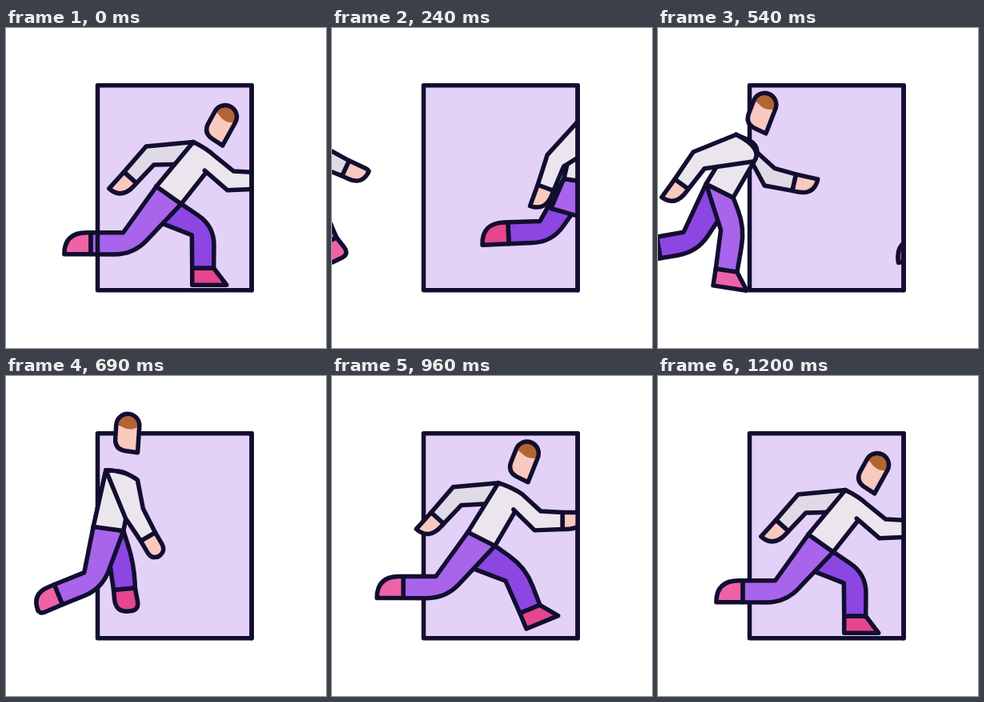
These frames come from a looping animation (400 by 400 pixels, 1.73 s). An HTML page with a canvas:

```html
<!DOCTYPE html>
<html lang="en">
<head>
<meta charset="utf-8">
<title>Runner in a doorway</title>
<style>
  html, body { margin: 0; width: 100%; height: 100%; overflow: hidden; background: #fff; }
  canvas { display: block; width: 400px; height: 400px; }
</style>
</head>
<body>
<canvas id="stage"></canvas>
<script>
const LOOP = 1730, RUN = 1200, STEP = 30;
const HOME = 203.5, ENTER = 418, LEAVE = 292;
const DOOR = { x: 114.5, y: 71.7, w: 192.6, h: 256 };
const INK = '#120e30', SKIN = '#f9c9c0', HAIR = '#b26532';
const NEAR = { leg: '#a864eb', shoe: '#ee63a6', shirt: '#ebe6ed', pit: [22, -52], tuck: 0 };
const FAR = { leg: '#8c46e2', shoe: '#e5468e', shirt: '#dfdae6', pit: [17, -60], tuck: 8 };

const canvas = document.getElementById('stage');
const ctx = canvas.getContext('2d');
const dpr = window.devicePixelRatio || 1;
canvas.width = canvas.height = 400 * dpr;

const rad = deg => deg * Math.PI / 180;
const clamp = (v, lo = 0, hi = 1) => Math.min(hi, Math.max(lo, v));
const ramp = (v, a, b) => clamp((v - a) / (b - a));
const smooth = (v, a, b) => { const k = ramp(v, a, b); return k * k * (3 - 2 * k); };
const hump = (v, mid, half) => clamp(1 - Math.abs(v - mid) / half);
const lerp = (a, b, k) => a + (b - a) * k;
const mix = (p, q, k) => [lerp(p[0], q[0], k), lerp(p[1], q[1], k)];
const blend = (s, p, q, r) => s < .5 ? mix(p, q, s * 2) : mix(q, r, s * 2 - 1);
const go = (p, v, d) => [p[0] + v[0] * d, p[1] + v[1] * d];
const down = deg => [Math.sin(rad(deg)), Math.cos(rad(deg))];
const front = deg => [Math.cos(rad(deg)), -Math.sin(rad(deg))];

// Limb cycles: q runs 0..2, fully forward at 0, fully back at 1.
// Angles in degrees: 0 hangs down, + swings forward.
function legPose(q) {
  const thigh = 44 - 84 * ramp(q, 0, .62) + 84 * ramp(q, 1.13, 1.57);
  return {
    upper: thigh,
    upperLen: 50 + .48 * Math.abs(thigh - 20),
    lower: -90 * smooth(q, .08, .62) + 115 * smooth(q, 1.1, 1.57) - 25 * ramp(q, 1.8, 2),
    lowerLen: 47 + 6 * hump(q, .2, .2) - 20 * hump(q, 1.42, .35),
    trail: ramp(q, .18, .5) - ramp(q, 1.2, 1.8)
  };
}

function armPose(q) {
  const upper = 54 - 146 * smooth(q, .05, .85) + 146 * smooth(q, 1.08, 1.58);
  const lower = 90 - 132 * smooth(q, .05, .75) + 132 * smooth(q, 1.1, 1.75);
  return {
    upper, lower,
    upperLen: 42 + .18 * Math.abs(upper - 10),
    lowerLen: 35 - .045 * lower
  };
}

// Polygon of [x, y, cornerRadius] points.
function shape(points, fill, open) {
  ctx.beginPath();
  points.forEach((p, i) => {
    const r = p[2] || 0;
    if (r < .5) return ctx.lineTo(p[0], p[1]);
    const n = points.length;
    const toward = q => {
      const len = Math.hypot(q[0] - p[0], q[1] - p[1]) || 1;
      return mix(p, q, Math.min(1, r / len));
    };
    const a = toward(points[(i + n - 1) % n]), b = toward(points[(i + 1) % n]);
    ctx.lineTo(a[0], a[1]);
    ctx.quadraticCurveTo(p[0], p[1], b[0], b[1]);
  });
  if (!open) ctx.closePath();
  ctx.fillStyle = fill;
  ctx.fill();
  ctx.stroke();
}

// Two-bone chain with its edge points at the middle and end joints.
function limb(root, pose, midHalf, endHalf) {
  const d = down(pose.upper), dir = down(pose.lower), side = front(pose.lower);
  const mid = go(root, d, pose.upperLen), end = go(mid, dir, pose.lowerLen);
  const across = front((pose.upper + pose.lower) / 2);
  return {
    dir, side,
    midBack: go(mid, across, -midHalf), midFront: go(mid, across, midHalf),
    endBack: go(end, side, -endHalf), endFront: go(end, side, endHalf)
  };
}

function drawLeg(at, q, tone) {
  const pose = legPose(q), { trail } = pose;
  const l = limb(at(0, 0), pose, 15, 13.5);
  const hipBack = at(-19, 0), hipFront = at(19, 0);
  const seat = go(hipBack, [-16, 37], ramp(pose.upper, 20, 42));
  shape([hipBack, seat, l.midBack, l.endBack, l.endFront, [...l.midFront, 24], hipFront], tone.leg);
  const long = lerp(21, 33, trail);
  const heel = go(l.endBack, l.dir, long);
  const toe = go(go(l.endFront, l.dir, long), l.side, 16 * (1 - trail) ** 2);
  shape([l.endBack, [...heel, 28 * trail], [...toe, 48 * trail * (1 - trail)], l.endFront], tone.shoe);
}

function drawArm(at, q, tone) {
  const pose = armPose(q);
  const l = limb(at(3, -60), pose, 12.5, 10.5);
  const s = ramp(pose.lower, -20, 85), drop = tone.tuck * s;
  const neck = [-13, -72];
  const back = blend(s, neck, neck, [19, -51]);
  const top = blend(s, tone.pit, [28, -66], [20, -73]);
  const cap = blend(s, [25, -72], [10, -75], [5, -75]);
  shape([l.endBack, [...go(l.endBack, l.dir, 28), 24 * s],
    [...go(l.endFront, l.dir, 28), 24 * (1 - s)], l.endFront], SKIN);
  shape([at(...back), l.midBack, l.endBack, l.endFront, l.midFront,
    at(top[0] - drop / 2, top[1] + drop), [...at(cap[0], cap[1] + drop), 99], at(...neck)],
    tone.shirt, true);
}

function headPath() {
  ctx.beginPath();
  ctx.moveTo(14.5, 33);
  ctx.lineTo(14.5, 0);
  ctx.arc(0, 0, 14.5, 0, Math.PI, true);
  ctx.lineTo(-14.5, 17);
  ctx.quadraticCurveTo(-14.5, 31, 0, 32);
  ctx.closePath();
}

function drawHead(x, y, tilt) {
  ctx.save();
  ctx.translate(x, y);
  ctx.rotate(rad(tilt));
  headPath();
  ctx.fillStyle = SKIN;
  ctx.fill();
  ctx.beginPath();
  ctx.arc(0, 0, 14.5, 0, Math.PI, true);
  ctx.quadraticCurveTo(-9, 1, -5, 3);
  ctx.quadraticCurveTo(5, 7, 14.5, 0);
  ctx.fillStyle = HAIR;
  ctx.fill();
  headPath();
  ctx.stroke();
  ctx.restore();
}

// The body sinks and leans on each contact, rises and straightens between.
function drawRunner(x, phase) {
  const sink = Math.cos(phase * 2 * Math.PI);
  const y = 199.7 + 9.3 * sink, lean = rad(21 + 14 * sink);
  const c = Math.cos(lean), s = Math.sin(lean);
  const at = (u, v) => [x + u * c - v * s, y + u * s + v * c];
  const same = phase % 2, opposite = (phase + 1) % 2;
  ctx.save();
  ctx.beginPath();
  ctx.rect(-10, 0, DOOR.x + DOOR.w + 10, 400);
  ctx.clip();
  drawArm(at, opposite, FAR);
  drawLeg(at, same, FAR);
  drawLeg(at, opposite, NEAR);
  shape([at(-19, 0), at(-13, -72), [...at(22, -74), 20], at(22, -52), at(19, 0)], NEAR.shirt);
  drawArm(at, same, NEAR);
  drawHead(x + 46.7 + 23.8 * sink, y - 114 + 16 * sink, 16 + 13 * sink);
  ctx.restore();
}

function render(now) {
  const t = Math.min(RUN, Math.floor(now % LOOP / STEP) * STEP);
  const left = 1 - t / RUN;
  const phase = 2 * (1 - left ** 1.5);

  ctx.setTransform(dpr, 0, 0, dpr, 0, 0);
  ctx.fillStyle = '#fff';
  ctx.fillRect(0, 0, 400, 400);
  ctx.strokeStyle = INK;
  ctx.lineWidth = 5.5;
  ctx.lineJoin = ctx.lineCap = 'round';

  ctx.fillStyle = '#e4d1f8';
  ctx.fillRect(DOOR.x, DOOR.y, DOOR.w, DOOR.h);
  drawRunner(HOME + LEAVE * (1 - left ** 2), phase);   // leaving, behind the frame
  ctx.strokeRect(DOOR.x, DOOR.y, DOOR.w, DOOR.h);
  drawRunner(HOME - ENTER * left ** 2, phase);         // arriving, in front of it
  ctx.beginPath();
  ctx.moveTo(DOOR.x + DOOR.w, DOOR.y);
  ctx.lineTo(DOOR.x + DOOR.w, DOOR.y + DOOR.h);
  ctx.stroke();
}

const start = performance.now();
function tick() {
  render(performance.now() - start);
  requestAnimationFrame(tick);
}
tick();
</script>
</body>
</html>
```
